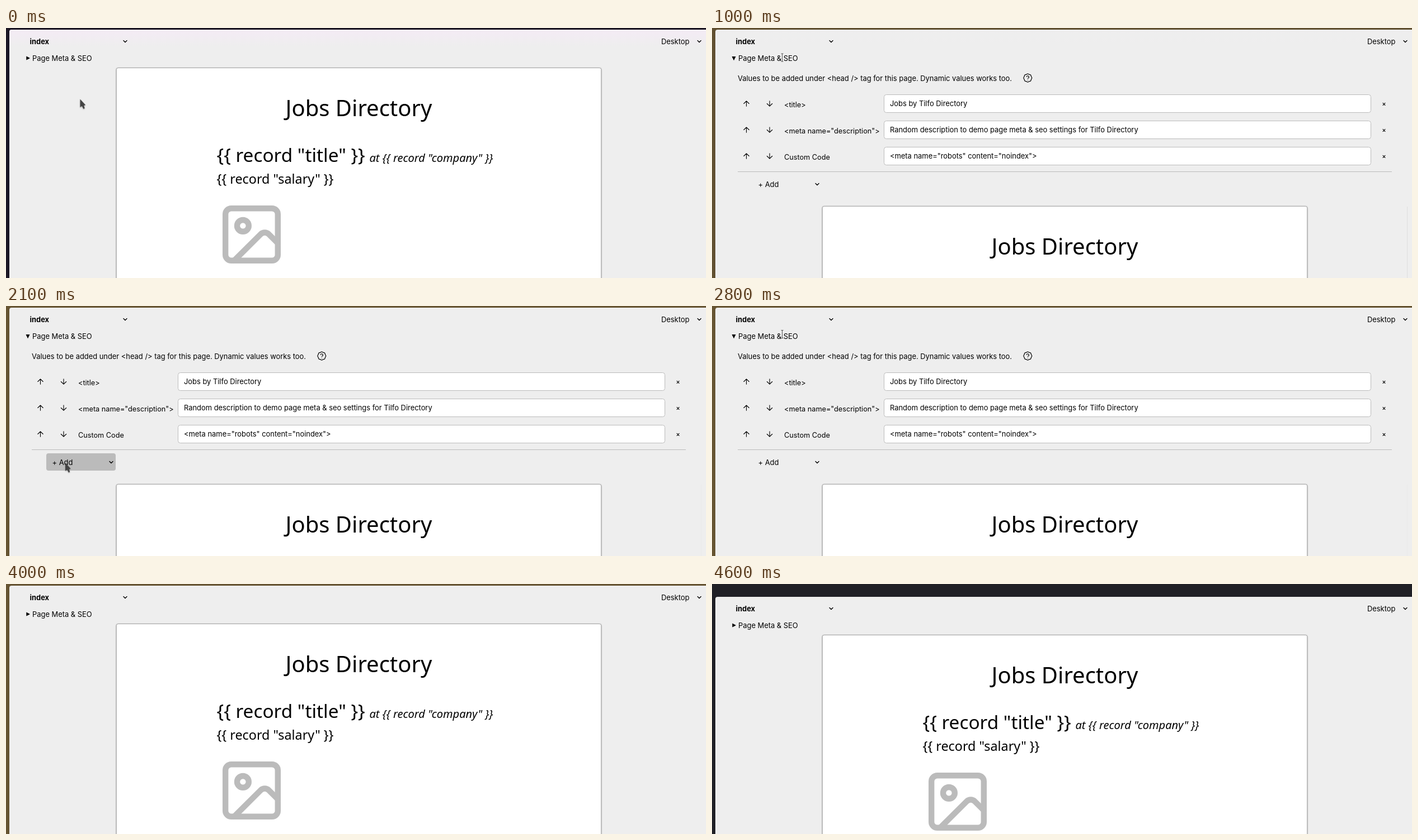
Write an HTML page that moves like this. It is 1251 px wide and 448 px high and loops after 4.9 s.

```html
<!DOCTYPE html>
<html lang="en">
<head>
<meta charset="utf-8">
<title>Page meta settings</title>
<style>
  html, body { margin: 0; width: 100%; height: 100%; overflow: hidden; }
  svg { display: block; }
  text { white-space: pre; }
  .ui { font: 12.9px Inter, "Open Sans", sans-serif; }
  .page { font-family: "Noto Sans", "Open Sans", sans-serif; }
  .sheet { fill: #fff; filter: drop-shadow(0 0 1px #0009) drop-shadow(0 0 .6px #0008); }
  .line { fill: none; stroke: #000; stroke-linecap: round; stroke-linejoin: round; }
  .field { fill: #fff; stroke: #bbb; }
</style>
</head>
<body>
<svg width="1251" height="448" viewBox="0 0 1251 448">
  <defs>
    <linearGradient id="tint" x2="0" y2="1">
      <stop stop-color="#f4ebf5"/>
      <stop offset="1" stop-color="#eee"/>
    </linearGradient>
    <path id="chevron" class="line" stroke-width="1.4" d="M-3-1.5 0 1.5 3-1.5"/>
    <path id="up" class="line" stroke-width="1.1" d="M-4.7 0 0-4.7 4.7 0M0 4.7V-4.7"/>
  </defs>

  <rect id="wall" width="1251" height="448"/>
  <g id="panel">
    <rect x="6" y="3" width="1260" height="460" rx="4" fill="#eee"/>
    <rect id="glow" x="6" y="3" width="1260" height="30" rx="4" fill="url(#tint)"/>

    <g class="ui">
      <text x="42.5" y="28.5" font-weight="700">index</text>
      <use href="#chevron" x="213" y="24"/>
      <text x="1171" y="28.5">Desktop</text>
      <use href="#chevron" x="1239" y="24"/>
      <path id="marker"/>
      <text x="47" y="58.5">Page Meta &amp; SEO</text>
    </g>

    <g id="settings" class="ui">
      <text x="46" y="95.3">Values to be added under &lt;head /&gt; tag for this page. Dynamic values works too.</text>
      <g class="line" stroke-width="1.6" transform="translate(555.4 80.6) scale(.74)">
        <path d="M3.85 8.62a4 4 0 0 1 4.78-4.77 4 4 0 0 1 6.74 0 4 4 0 0 1 4.78 4.78 4 4 0 0 1 0 6.74 4 4 0 0 1-4.77 4.78 4 4 0 0 1-6.75 0 4 4 0 0 1-4.78-4.77 4 4 0 0 1 0-6.76Z"/>
        <path d="M9.09 9a3 3 0 0 1 5.83 1c0 2-3 3-3 3M12 17h.01"/>
      </g>
      <g id="rows"></g>
      <path d="M46 257.5H1215" stroke="#bbb"/>
      <rect id="hover" x="72" y="264" width="124" height="31" rx="4" fill="#bbb"/>
      <text x="82.5" y="284.5">+ Add</text>
      <use href="#chevron" x="188" y="280"/>
      <path id="scrollbar" d="M1242.5 320V448" stroke="#dedede"/>
    </g>

    <g id="page" class="page">
      <rect class="sheet" x="197.5" y="72" width="866" height="600" rx="3"/>
      <text x="630.5" y="157.5" font-size="40" text-anchor="middle">Jobs Directory</text>
      <text x="376.5" y="240.3" font-size="33.33">{{ record "title" }}</text>
      <text x="649.5" y="240.3" font-size="20" font-weight="300" font-style="italic">at {{ record "company" }}</text>
      <text x="376.5" y="278.7" font-size="23.33">{{ record "salary" }}</text>
      <g transform="translate(376.6 307.6) scale(5.2)" fill="none" stroke="#bbb" stroke-width="2" stroke-linecap="round" stroke-linejoin="round">
        <rect x="3" y="3" width="18" height="18" rx="2"/>
        <circle cx="9" cy="9" r="2"/>
        <path d="m21 15-3.086-3.086a2 2 0 0 0-2.828 0L6 21"/>
      </g>
    </g>
  </g>

  <path id="arrow" d="M0 0V14.5L3.2 12.2 6 17.5 8.2 16.3 6.6 11.6 9.6 10.4Z" fill="#444" style="filter:drop-shadow(0 1px 1px #0005)"/>
  <path id="beam" d="M-2-7H2M-2 7H2M0-7V7" fill="none" stroke="#555"/>
</svg>
<script>
const $ = id => document.getElementById(id);
const show = (id, on) => $(id).style.display = on ? '' : 'none';
const place = (id, x, y) => $(id).setAttribute('transform', `translate(${x} ${y})`);

const fields = [
  ['&lt;title&gt;', 'Jobs by Tilfo Directory'],
  ['&lt;meta name="description"&gt;', 'Random description to demo page meta &amp; seo settings for Tilfo Directory'],
  ['Custom Code', '&lt;meta name="robots" content="noindex"&gt;']
];
$('rows').innerHTML = fields.map(([label, value], i) => `
  <g transform="translate(0 ${i * 47})">
    <use href="#up" x="61.5" y="135.5"/>
    <use href="#up" transform="translate(103 135.5) scale(1 -1)"/>
    <text x="129" y="141.5" font-size="12.7">${label}</text>
    <rect class="field" x="307.5" y="119.5" width="870" height="32" rx="4"/>
    <text x="318" y="140">${value}</text>
    <path class="line" stroke-width="1.1" d="M1199 134.3l4 4m0-4l-4 4"/>
  </g>`).join('');

// Pointer moves: start, steps of 100 ms, end point
const moves = [
  [100, 4, 125.5, 53],
  [1500, 6, 106, 280],
  [2100, 1, 106, 281],
  [2300, 6, 125.5, 50.5],
  [3600, 3, 124, -25]
];

function pointer(t) {
  let x = 132.5, y = 127.5;
  for (const [start, steps, toX, toY] of moves) {
    if (t < start) break;
    const p = Math.min(1, (t - start + 100) / (steps * 100));
    const e = p * p * (3 - 2 * p);
    x += (toX - x) * e;
    y += (toY - y) * e;
  }
  return [x, y];
}

const mix = (a, b, p) => `rgb(${a.map((v, i) => Math.round(v + (b[i] - v) * p))})`;

function draw(now) {
  const t = Math.floor(now % 4900 / 100) * 100;
  const open = t >= 1000 && t < 3200;
  const [x, y] = pointer(t);

  const warm = [0, .55, .8, .93, .97, 1][Math.max(0, Math.min(5, (t - 700) / 100))];
  const cool = Math.max(0, Math.min(1, (t - 4400) / 200));
  $('wall').setAttribute('fill', t < 4500
    ? mix([28, 23, 36], [102, 84, 50], warm)
    : mix([102, 84, 50], [32, 32, 38], cool));
  $('glow').style.opacity = 1 - warm;
  place('panel', 0, 20 * cool);

  $('marker').setAttribute('d', open ? 'M35.5 51h7L39 58.3Z' : 'M36.3 50.5v7L43 54Z');
  show('settings', open);
  place('page', 0, open ? 248 : 0);
  $('scrollbar').style.opacity = t < 1500 ? 1 : t < 2000 ? .6 : .25;
  show('hover', x > 72 && x < 196 && y > 264 && y < 295);

  const overText = y > 44 && y < 64;
  show('beam', overText);
  show('arrow', !overText && y > -20);
  place('beam', x, y);
  place('arrow', x, y);
  requestAnimationFrame(() => draw(performance.now() - begin));
}
const begin = performance.now();
draw(0);
</script>
</body>
</html>
```
